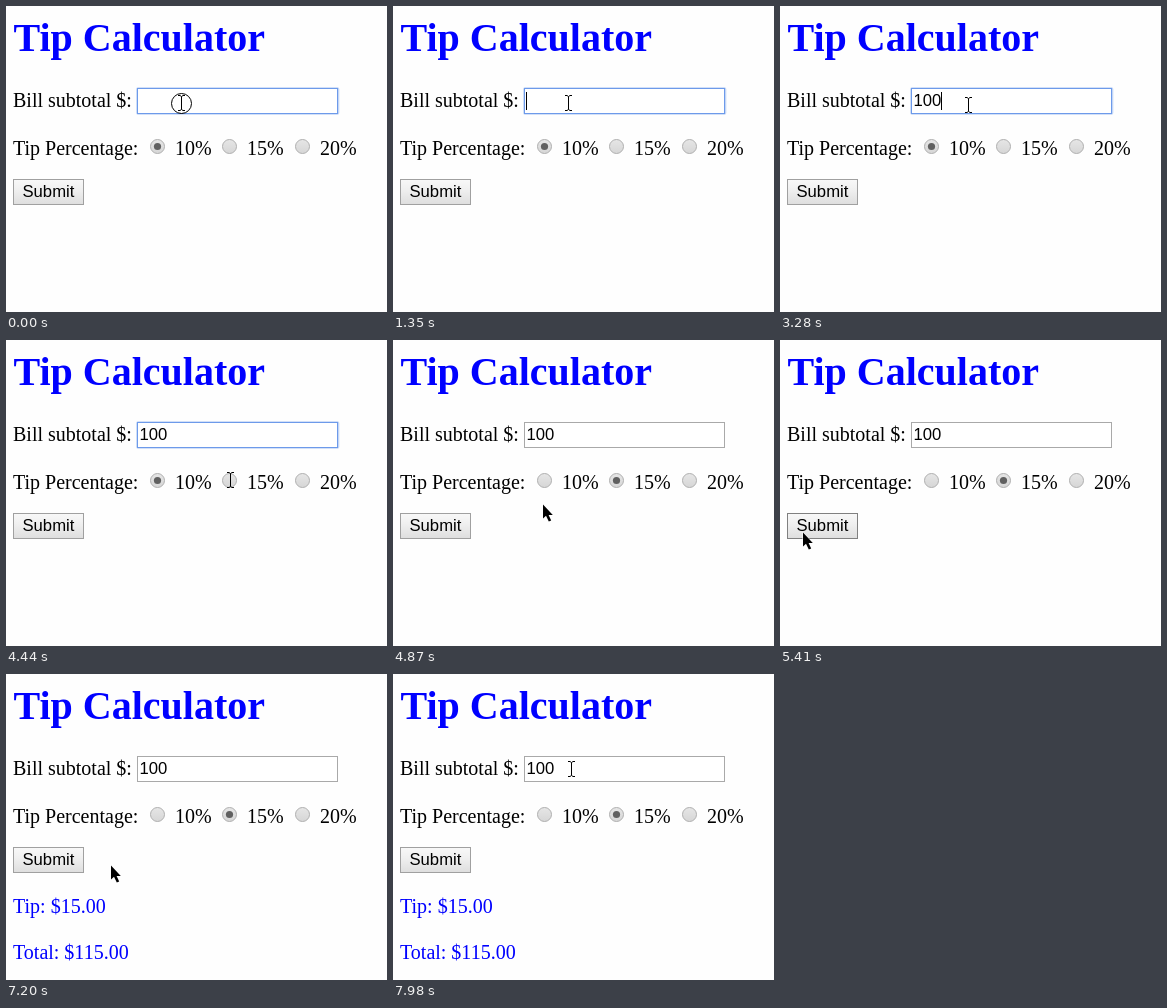
An HTML page for the animation above (8 s loop, 381 by 306 pixels).

```html
<!DOCTYPE html>
<html lang="en">
<head>
<meta charset="utf-8">
<title>Tip Calculator</title>
<style>
  html, body { margin: 0; width: 100%; height: 100%; overflow: hidden; background: #fefefe; }
  svg { display: block; }
  text { font: 20px "Liberation Serif", "Times New Roman", serif; }
  .title { font-size: 40px; font-weight: bold; fill: #00f; }
  .control { font: 16.67px "Liberation Sans", Arial, sans-serif; }
  .result { fill: #00f; }
</style>
</head>
<body>
<svg width="381" height="306" viewBox="0 0 381 306">
  <defs>
    <linearGradient id="face" x2="0" y2="1">
      <stop offset="0" stop-color="#f8f8f8"/>
      <stop offset=".4" stop-color="#f0f0f0"/>
      <stop offset="1" stop-color="#dedede"/>
    </linearGradient>
    <linearGradient id="knob" x2="0" y2="1">
      <stop offset="0" stop-color="#e6e6e6"/>
      <stop offset="1" stop-color="#d6d6d6"/>
    </linearGradient>
  </defs>

  <text class="title" x="7.5" y="45">Tip Calculator</text>

  <text x="7" y="101">Bill subtotal $:</text>
  <rect id="glow" x="131" y="82" width="201.5" height="26" rx="1" fill="none" stroke="#c3d6f6" stroke-width="1.6"/>
  <rect id="field" x="131.5" y="82.5" width="200" height="25" fill="#fff"/>
  <text id="amount" class="control" x="133.5" y="100"></text>
  <rect id="caret" y="86" width="1" height="18"/>

  <text x="7" y="149">Tip Percentage:</text>
  <g id="radios"></g>

  <rect id="button" x="7.5" y="173.5" width="70" height="25" fill="url(#face)"/>
  <text class="control" x="16.5" y="191">Submit</text>

  <g id="results">
    <text class="result" x="7" y="239">Tip: $15.00</text>
    <text class="result" x="7" y="285">Total: $115.00</text>
  </g>

  <g id="pointer">
    <circle id="ring" cx=".5" cy=".5" r="10" fill="none" stroke="#000"/>
    <path id="beam" d="M-3 -7.5H-1L.5 -6.5L2 -7.5H4M.5 -6.5V6.5M-3 7.5H-1L.5 6.5L2 7.5H4" fill="none" stroke="#000"/>
    <path id="arrow" d="M0 -.5V13.5L3 10.7L5.8 16.5L8.2 15.5L5.6 9.9H9.8Z" stroke="#fff" stroke-width="1" paint-order="stroke"/>
  </g>
</svg>
<script>
const LOOP = 8000;
const $ = id => document.getElementById(id);
const show = (el, on) => el.setAttribute('visibility', on ? 'visible' : 'hidden');

// Each step: start time, then the values that hold from there on
const pointerSteps = [
  [0, 175, 97, 'beam'], [1750, 184, 98, 'beam'], [1870, 188, 99, 'beam'],
  [4140, 209, 129, 'beam'], [4290, 219, 138, 'arrow'], [4440, 224, 140, 'beam'],
  [4600, 223, 141, 'arrow'], [4870, 150, 165, 'arrow'], [4990, 84, 186, 'arrow'],
  [5290, 45, 190, 'arrow'], [5410, 23, 193, 'arrow'], [7200, 105, 192, 'arrow'],
  [7320, 181, 175, 'arrow'], [7590, 181, 150, 'arrow'], [7710, 180, 122, 'arrow'],
  [7830, 178, 103, 'beam'], [7980, 178, 95, 'beam']
];
const caretSteps = [
  [0, false], [300, true], [770, false], [1350, true], [2020, false],
  [2460, true], [2890, false], [3160, true], [3840, false]
];
const amountSteps = [[0, ''], [3160, '10'], [3280, '100']];
const ringSteps = [[0, true], [300, false], [4600, true], [4720, false]];
const choiceSteps = [[0, 0], [4720, 1]];

const at = (steps, t) => steps.findLast(step => step[0] <= t).slice(1);

function add(tag, attrs, text = '') {
  const el = document.createElementNS('http://www.w3.org/2000/svg', tag);
  for (const key in attrs) el.setAttribute(key, attrs[key]);
  el.textContent = text;
  return $('radios').appendChild(el);
}

const dots = [[151.5, 169, '10%'], [223.5, 241, '15%'], [296.5, 314, '20%']].map(([cx, x, label]) => {
  add('circle', { cx, cy: 140.5, r: 7, fill: 'url(#knob)', stroke: '#b0b0b0' });
  add('text', { x, y: 149 }, label);
  return add('circle', { cx, cy: 140.5, r: 3.6, fill: '#606060' });
});

function draw(t) {
  const [x, y, kind] = at(pointerSteps, t);
  $('pointer').setAttribute('transform', `translate(${x} ${y})`);
  show($('beam'), kind === 'beam');
  show($('arrow'), kind === 'arrow');
  show($('ring'), at(ringSteps, t)[0]);

  const [amount] = at(amountSteps, t);
  $('amount').textContent = amount;
  $('caret').setAttribute('x', 133 + Math.round(amount.length * 9.27));
  show($('caret'), at(caretSteps, t)[0]);

  const focused = t < 4600;
  show($('glow'), focused);
  $('field').setAttribute('stroke', focused ? '#6d9aea' : '#a9a9a9');

  const [choice] = at(choiceSteps, t);
  dots.forEach((dot, i) => show(dot, i === choice));

  const hover = t >= 5410 && t < 6370;
  $('button').setAttribute('stroke', hover ? '#808080' : '#a0a0a0');
  show($('results'), t >= 6370);
}

const start = performance.now();
function tick() {
  draw((performance.now() - start) % LOOP);
  requestAnimationFrame(tick);
}
tick();
</script>
</body>
</html>
```
